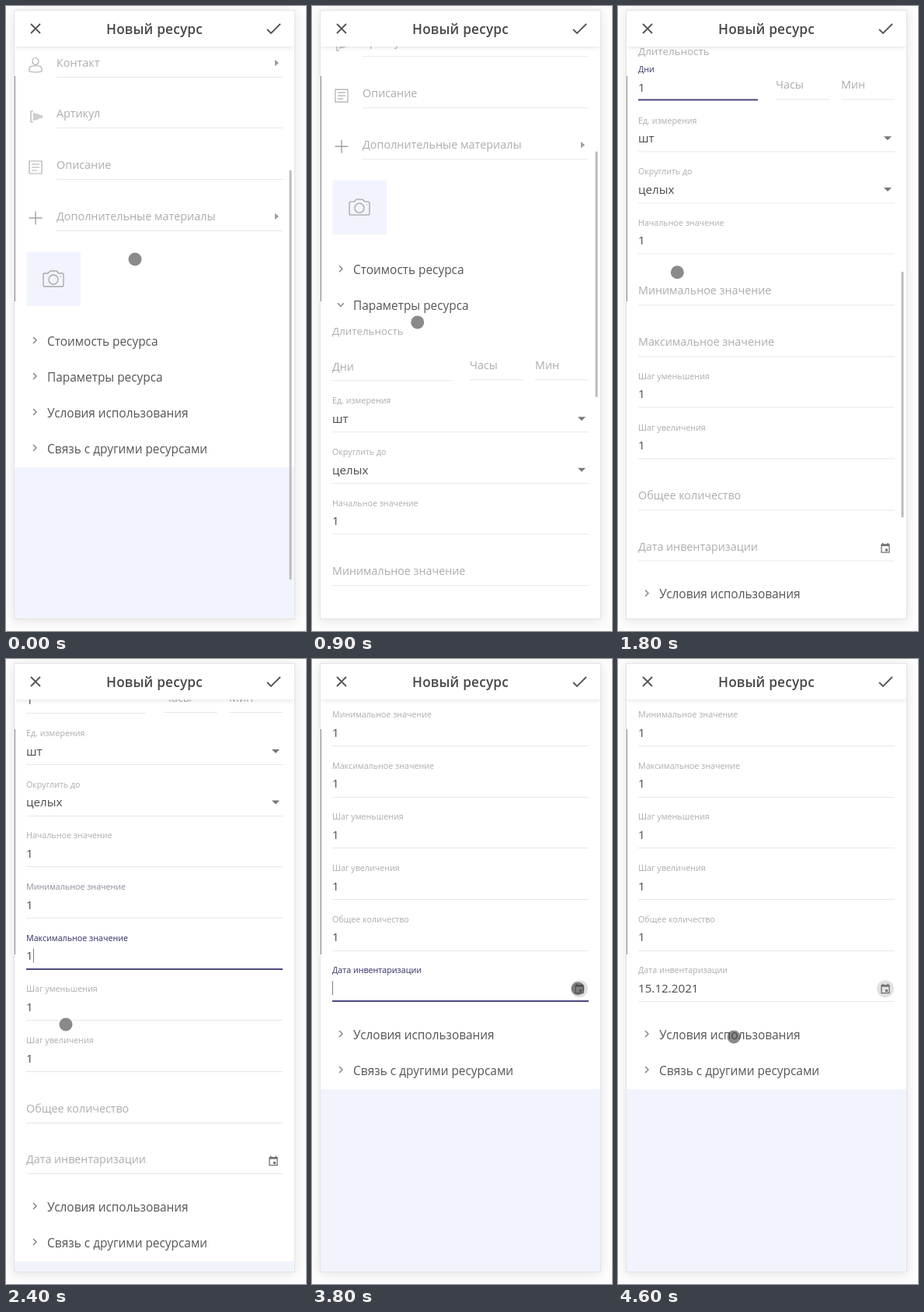
Recreate the animation shown at these times as an HTML page with a canvas. Size 386x802 px, loop 4700 ms.

```html
<!DOCTYPE html>
<html lang="ru">
<head>
<meta charset="utf-8">
<title>Новый ресурс</title>
<style>
html, body { margin: 0; width: 100%; height: 100%; overflow: hidden; background: #fdfdfd; }
canvas { display: block; }
</style>
</head>
<body>
<canvas id="stage" width="386" height="802"></canvas>
<script>
const c = document.getElementById('stage').getContext('2d');
const LOOP = 4700, STEP = 100;
const TOP = 52, BOTTOM = 786, VIEW = BOTTOM - TOP;
const EXTRA = 684;              // height of the opened section
const GREY = '#adadad', INK = '#555', BLUE = '#4c4a80', RULE = '#e7e7e7';

// Tracks: [time, value, ...]
const SCROLL = [[100, 0], [400, 63], [800, 63], [1100, 174], [1500, 174], [1900, 503],
  [2700, 503], [3000, 723], [3100, 724]];
const POINTER = [[0, 166, 325], [600, 147, 409], [800, 147, 409], [1200, 75, 389], [1500, 75, 389],
  [2000, 77, 316], [2100, 77, 316], [2250, 77, 381], [2400, 77, 469], [2500, 77, 577],
  [2700, 77, 577], [3000, 91, 513], [3200, 91, 513], [3600, 342, 423], [3900, 342, 423],
  [4300, 195, 395], [4400, 195, 395], [4600, 149, 485]];
const BAR_SHOWN = [[0, 500], [800, 1300], [1500, 2100], [2700, 3300]];

const FIELDS = [
  { label: 'Дни', value: '1', focus: 1150, typed: 1300, blur: 2000, right: 180 },
  { label: 'Ед. измерения', value: 'шт', select: true },
  { label: 'Округлить до', value: 'целых', select: true },
  { label: 'Начальное значение', value: '1' },
  { label: 'Минимальное значение', value: '1', focus: 2000, typed: 2100, blur: 2250 },
  { label: 'Максимальное значение', value: '1', focus: 2250, typed: 2400, blur: 2500 },
  { label: 'Шаг уменьшения', value: '1' },
  { label: 'Шаг увеличения', value: '1' },
  { label: 'Общее количество', value: '1', focus: 2500, typed: 2700, blur: 3550 },
  { label: 'Дата инвентаризации', value: '15.12.2021', focus: 3550, typed: 4400, blur: 4400, date: true }
];

const ramp = (t, a, b) => Math.min(1, Math.max(0, (t - a) / (b - a)));
const ease = p => p * p * (3 - 2 * p);

function track(keys, t) {
  const i = keys.findIndex(k => k[0] > t);
  if (i === 0) return keys[0].slice(1);
  if (i < 0) return keys[keys.length - 1].slice(1);
  const a = keys[i - 1], b = keys[i], p = ease(ramp(t, a[0], b[0]));
  return a.slice(1).map((v, n) => v + (b[n + 1] - v) * p);
}

// y is the optical middle of the line
function text(s, x, y, size, color, weight = 400, spacing = 0) {
  c.font = `${weight} ${size}px "Open Sans", "Noto Sans", sans-serif`;
  c.letterSpacing = spacing + 'px';
  c.fillStyle = color;
  c.fillText(s, x, y + size * .35);
}
function rect(x, y, w, h, color) {
  c.fillStyle = color;
  c.fillRect(x, y, w, h);
}
function disc(x, y, r, color) {
  c.fillStyle = color;
  c.beginPath();
  c.arc(x, y, r, 0, 7);
  c.fill();
}
function stroke(d, x, y, color = GREY, width = 1.2, turn = 0) {
  c.save();
  c.translate(x, y);
  c.rotate(turn);
  c.strokeStyle = color;
  c.lineWidth = width;
  c.stroke(new Path2D(d));
  c.restore();
}
function shape(d, x, y, color) {
  c.save();
  c.translate(x, y);
  c.fillStyle = color;
  c.fill(new Path2D(d));
  c.restore();
}
function clip(y, h, draw) {
  c.save();
  c.beginPath();
  c.rect(11, y, 360, h);
  c.clip();
  draw();
  c.restore();
}

function iconRow(label, y, arrow) {
  text(label, 65, y, 14.4, GREY);
  rect(65, y + 18, 291, 1, RULE);
  if (arrow) shape('M-2-4L3 0L-2 4Z', 348, y, '#999');
}

function sectionRow(label, y, open = 0) {
  stroke('M-2-4L2 0L-2 4', 37, y - 1, '#888', 1.5, open * Math.PI / 2);
  text(label, 53, y + .5, 15.4, INK);
}

function generalPart() {
  iconRow('Контакт', 73, true);
  stroke('M4-5A4 4.5 0 1 1-4-5A4 4.5 0 1 1 4-5M-8 8V5Q-8 1-4 1H4Q8 1 8 5V8Q0 10-8 8Z', 38, 76);
  iconRow('Артикул', 138);
  stroke('M-3-7H-6V7H-3M-2-5V5M0-4V4M2-4V4M4-3V3M6-2V2M8-2V2', 38, 142);
  iconRow('Описание', 204);
  stroke('M-8-8H8V8H-8ZM-5-4H5M-5 0H5M-5 4H2', 38, 207);
  iconRow('Дополнительные материалы', 270, true);
  stroke('M-8.5 0H8.5M0-8.5V8.5', 38, 272, '#a2a2a2', 1.4);
  rect(26.5, 315.5, 69.5, 69.5, '#f1f4fd');
  stroke('M-11-7H-7L-4-10H4L7-7H11Q13-7 13-5V8Q13 10 11 10H-11Q-13 10-13 8V-5Q-13-7-11-7Z' +
    'M6 1A6 6 0 1 1-6 1A6 6 0 1 1 6 1M9-3H10', 61, 350, '#a6a6a6', 1.3);
}

function calendarIcon(x, y) {
  stroke('M-5-4.5H5V5.5H-5Z', x, y, '#707070', 1.3);
  rect(x - 5, y - 5, 10, 2.5, '#707070');
  rect(x - 4, y - 6.5, 1.5, 2, '#707070');
  rect(x + 2.5, y - 6.5, 1.5, 2, '#707070');
  rect(x, y + 1, 3, 3, '#707070');
}

function field(f, i, t) {
  const y = 555.3 + 65.65 * i, right = f.right || 356;
  const float = f.focus ? ease(ramp(t, f.focus, f.focus + 150)) : 1;
  const focused = t >= f.focus && t < f.blur;
  const tint = f.focus ? ramp(t, f.focus, f.focus + 100) * (1 - ramp(t, f.blur, f.blur + 200)) : 0;
  const labelY = y - 1 - 21.5 * float, size = 14.3 - 3.6 * float;
  text(f.label, 26, labelY, size, GREY);
  c.globalAlpha = tint;
  text(f.label, 26, labelY, size, BLUE);
  c.globalAlpha = 1;

  const line = Math.round(y + 17);
  rect(26, line, right - 26, 1, RULE);
  if (focused) {
    const w = (right - 26) * float;
    rect((26 + right - w) / 2, line - 1, w, 2, BLUE);
  }
  const filled = !f.focus || t >= f.typed;
  if (filled) text(f.value, 26, y + .5, 15.2, '#4c4c4c');
  if (focused && (t - f.focus) % 1000 < 500) rect(filled ? 35 : 26, y - 9, 1, 18, '#808080');
  if (f.select) shape('M-5-2H5L0 3Z', 347, y, '#777');
  if (f.date) {
    if (t >= 3700) disc(344, y + 1, 11, '#e1e1e1');
    calendarIcon(344, y + 1);
  }
}

function params(t) {
  text('Длительность', 26, 509.5, 13.4, GREY);
  FIELDS.forEach((f, i) => field(f, i, t));
  for (const [label, x] of [['Часы', 203], ['Мин', 287]]) {
    text(label, x, 553, 14.3, GREY);
    rect(x, 571, 69, 1, RULE);
  }
}

function content(t, scroll, open) {
  const shift = EXTRA * open;
  c.translate(0, -scroll);
  rect(11, 592 + shift, 360, 2000, '#f1f4fd');
  generalPart();
  sectionRow('Стоимость ресурса', 430);
  sectionRow('Параметры ресурса', 476, open);
  if (open) clip(496, shift, () => params(t));
  sectionRow('Условия использования', 522 + shift);
  sectionRow('Связь с другими ресурсами', 568 + shift);
}

function shadowed(blur, alpha, dy, draw) {
  c.save();
  c.shadowColor = `rgba(0,0,0,${alpha})`;
  c.shadowBlur = blur;
  c.shadowOffsetY = dy;
  draw();
  c.restore();
}

function header() {
  shadowed(6, .12, 1, () => rect(11, 6, 360, TOP - 6, '#fff'));
  stroke('M-6-6L6 6M6-6L-6 6', 38, 29, '#555', 1.8);
  text('Новый ресурс', 129, 30, 17.2, '#484848', 600, .22);
  stroke('M-8 1L-3 6L9-6', 344, 29, '#555', 1.8);
}

function draw(t) {
  const [scroll] = track(SCROLL, t), [px, py] = track(POINTER, t);
  const open = ease(ramp(t, 650, 900));
  rect(0, 0, 386, 802, '#fdfdfd');
  shadowed(14, .1, 2, () => rect(10, 5, 362, 782, '#e3e3e3'));
  rect(11, 6, 360, 780, '#fff');
  clip(TOP, VIEW, () => content(t, scroll, open));
  clip(6, 780, header);
  rect(11, 90, 1, 289, '#8c8c8c');

  if (BAR_SHOWN.some(([a, b]) => t >= a && t <= b)) {
    const k = VIEW / (1026 + EXTRA * open);
    rect(364.5, TOP + (scroll + 222) * k, 3, VIEW * k, '#bcbcbc');
  }
  disc(px, py, 8.5, 'rgba(60,60,60,.6)');
}

function tick(now) {
  const t = Math.floor(now % LOOP / STEP) * STEP;
  draw(t < 200 ? 0 : t);
  requestAnimationFrame(tick);
}
requestAnimationFrame(tick);
</script>
</body>
</html>
```
